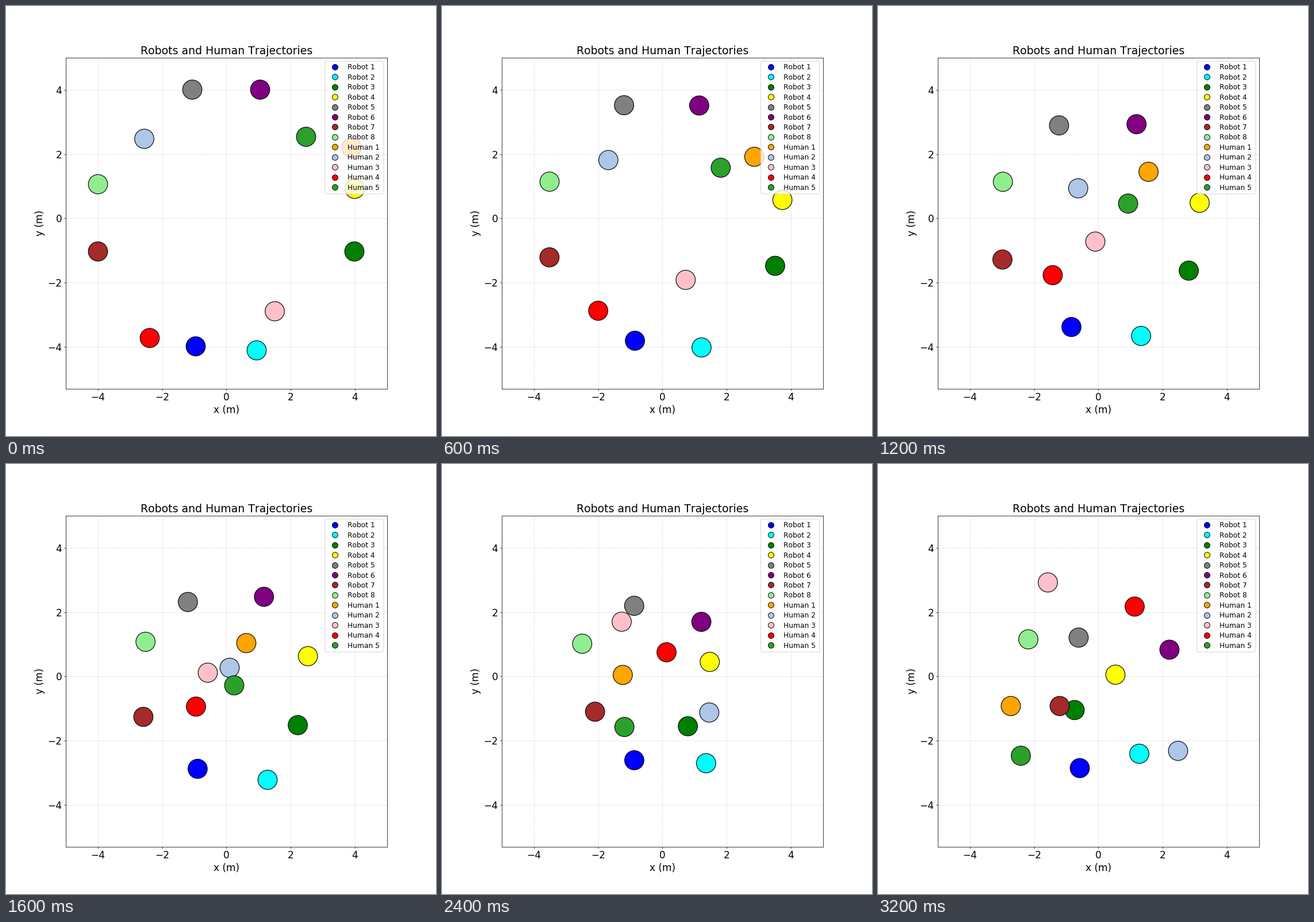
These frames come from a looping animation (748x748 px, 3.3 s). A matplotlib script:

```python
import matplotlib.pyplot as plt
import numpy as np
from matplotlib.animation import FuncAnimation
from matplotlib.patches import Circle, FancyBboxPatch
from matplotlib.transforms import Affine2D

SIZE, DPI = 748, 68
FRAMES, INTERVAL = 33, 100
RADIUS = 0.3
YLIM = (-5.3, 5)
SCALE = 0.77 * SIZE / (YLIM[1] - YLIM[0])      # pixels per metre
ORIGIN = np.array([0.5125 * SIZE, 0.12 * SIZE + YLIM[1] * SCALE])

# Robots swerve: stage positions at the start and at a few turns
ROBOT_KEYS = [0, 10, 20, 26, 32]
ROBOTS = {
    "blue": [(330, 592), (337, 569), (332, 512), (337, 519), (351, 529)],
    "cyan": [(436, 599), (457, 583), (454, 529), (461, 517), (454.5, 504)],
    "green": [(606, 427), (555, 460), (470, 450), (406, 456), (342, 428)],
    "yellow": [(606.5, 318), (573, 343), (492, 332), (453, 351), (413, 366.5)],
    "gray": [(324, 145.5), (315, 194), (322, 259), (340, 246), (349, 302)],
    "purple": [(442, 145.5), (449.5, 194), (449.5, 255), (457, 285), (507, 323)],
    "brown": [(160, 427), (206, 440.5), (257.5, 436.5), (273, 428), (316, 421)],
    "lightgreen": [(160, 310), (206, 305), (256, 312), (240, 312), (261.5, 305)],
}
# Humans cross the stage in one gentle arc: start, halfway, end
HUMAN_KEYS = [0, 16, 32]
HUMANS = {
    "orange": [(601, 246.5), (418, 311.5), (231, 421)],
    "#aec7e8": [(240.5, 231), (389, 354.5), (522, 499)],
    "pink": [(467.5, 531), (351, 363), (295.5, 206)],
    "red": [(250, 577.5), (330.5, 422), (446.5, 248)],
    "#2ca02c": [(522, 227.5), (397, 385), (248.5, 507.5)],
}


def smooth_path(t, points, n):
    """Cubic Hermite curve through the key points, in metres at steps n."""
    t, p = np.array(t, float), np.array(points, float)
    v = np.gradient(p, t, axis=0, edge_order=2)
    i = np.clip(np.searchsorted(t, n, side="right") - 1, 0, len(t) - 2)
    h = (t[i + 1] - t[i])[:, None]
    u = (n - t[i])[:, None] / h
    xy = ((1 + 2 * u) * (1 - u) ** 2 * p[i] + u * (1 - u) ** 2 * h * v[i]
          + u ** 2 * (3 - 2 * u) * p[i + 1] + u ** 2 * (u - 1) * h * v[i + 1])
    return (xy - ORIGIN) * [1, -1] / SCALE


def soft_ease(n, amount=0.3):
    """Mild slow start and stop over the whole run."""
    u = n / n[-1]
    return n[-1] * ((1 - amount) * u + amount * u ** 2 * (3 - 2 * u))


steps = np.arange(FRAMES)
agents = [*ROBOTS, *HUMANS]
paths = [smooth_path(ROBOT_KEYS, p, steps) for p in ROBOTS.values()]
paths += [smooth_path(HUMAN_KEYS, p, soft_ease(steps)) for p in HUMANS.values()]

plt.rcParams["font.family"] = "DejaVu Sans"
plt.rcParams["text.kerning_factor"] = 6
fig = plt.figure(figsize=(SIZE / DPI, SIZE / DPI), dpi=DPI, facecolor="white")
ax = fig.add_axes([0.125, 0.11, 0.775, 0.77])
ax.set(xlim=(-5, 5), ylim=YLIM, aspect="equal")
ax.set_xticks(range(-4, 5, 2))
ax.set_yticks(range(-4, 5, 2))
ax.tick_params(labelsize=18)
ax.set_title("Robots and Human Trajectories", fontsize=20)
ax.set_xlabel("x (m)", fontsize=18)
ax.set_ylabel("y (m)", fontsize=18)
ax.set_axisbelow(True)
ax.grid(linestyle="--", alpha=0.5)

discs = [ax.add_patch(Circle(path[0], RADIUS, facecolor=color,
                             edgecolor="black", linewidth=1.2, zorder=2))
         for color, path in zip(agents, paths)]


def draw_legend():
    px = Affine2D().scale(1 / SIZE, -1 / SIZE).translate(0, 1) + fig.transFigure
    fig.add_artist(FancyBboxPatch(
        (554.6, 96), 102.2, 231, boxstyle="round,pad=0,rounding_size=2.5",
        facecolor="white", edgecolor="0.8", alpha=0.8, linewidth=1,
        transform=px, zorder=1))
    names = [f"Robot {i + 1}" for i in range(len(ROBOTS))]
    names += [f"Human {i + 1}" for i in range(len(HUMANS))]
    for row, (name, color) in enumerate(zip(names, agents)):
        y = 105.7 + 17.46 * row
        fig.add_artist(plt.Line2D(
            [572], [y], marker="o", markersize=10.5, linestyle="none",
            markerfacecolor=color, markeredgecolor="black", transform=px))
        fig.text(593.9, y + 4.5, name, fontsize=13, va="baseline",
                 transform=px)


def update(n):
    for disc, path in zip(discs, paths):
        disc.center = path[n]
    return discs


draw_legend()
anim = FuncAnimation(fig, update, frames=FRAMES, interval=INTERVAL, repeat=True)
plt.show()
```
